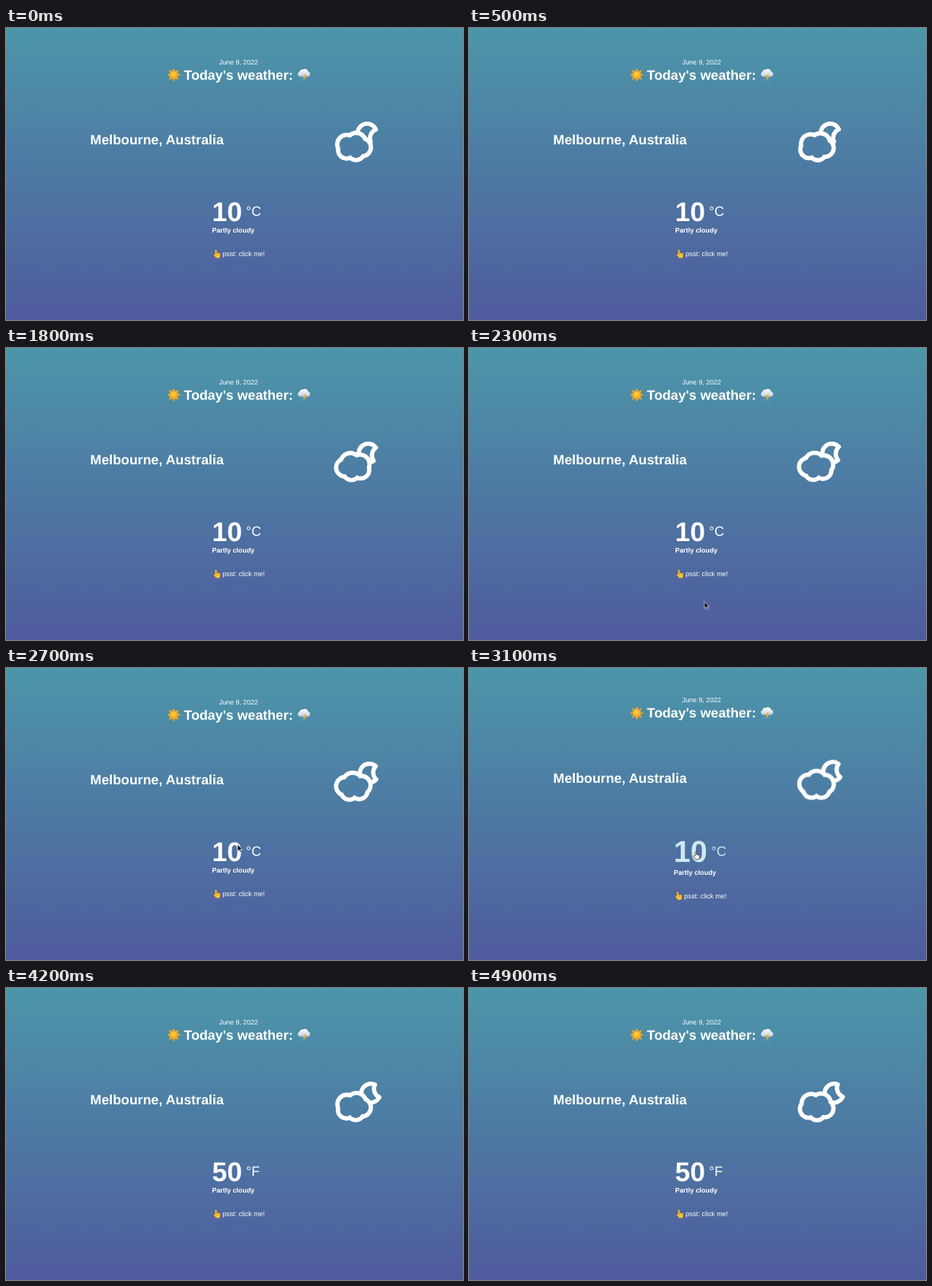
Animation, 600 px wide and 384 px high, one loop 5000 ms. Source, as an HTML page with a canvas:

```html
<!DOCTYPE html>
<html lang="en">
<head>
<meta charset="utf-8">
<title>Today's weather</title>
<style>
  html, body { margin: 0; width: 100%; height: 100%; overflow: hidden; }
  body { position: relative; background: linear-gradient(#4c96a9, #4f5b9d); }
  svg, canvas { position: absolute; display: block; }
  svg { left: 0; top: 0; width: 600px; height: 384px; }
  canvas { left: 425px; top: 107px; width: 80px; height: 80px; }
  text {
    font: 8.9px "Liberation Sans", Arial, Helvetica, sans-serif;
    fill: #fff; text-rendering: geometricPrecision; white-space: pre;
  }
  .bold { font-weight: 700; }
  .large { font-size: 17.8px; }
</style>
</head>
<body>
<svg viewBox="0 0 600 384">
  <defs>
    <radialGradient id="sunFill" cx=".45" cy=".4">
      <stop offset="0" stop-color="#ffd83f"/><stop offset="1" stop-color="#f9a71f"/>
    </radialGradient>
    <linearGradient id="cloudFill" x2="0" y2="1">
      <stop offset="0" stop-color="#fff"/><stop offset="1" stop-color="#c3cfdc"/>
    </linearGradient>
  </defs>

  <g id="upper">
    <text x="279.7" y="47.5">June 9, 2022</text>
    <text class="bold large" x="233.6" y="67.7">Today's weather:</text>
    <text class="bold large" x="110.6" y="153.2">Melbourne, Australia</text>
    <g transform="translate(220.3 61.6)">
      <g id="rays" fill="#f5a327"></g>
      <circle r="5.4" fill="url(#sunFill)"/>
    </g>
    <g transform="translate(382 53)">
      <path fill="url(#cloudFill)" d="M3.6 10.8a3.3 3.3 0 0 1-.2-6.3 3.6 3.6 0 0 1 4.3-2.7 4.4 4.4 0 0 1 7 2.4 3.4 3.4 0 0 1 .2 6.6z"/>
      <path fill="none" stroke="#4fa3e8" stroke-width="1.1" stroke-linecap="round" d="M4.6 11.8l-.7 1.7M7.3 13l-.8 2M13.6 11.8l-.7 1.7M5 15.3l-.4 1M12.8 15l-.5 1.2"/>
      <path fill="#f8a821" d="M9.4 8.2l-2 4.3h1.9l-1.2 4.6 4-5.8h-2l1.7-3.1z"/>
    </g>
  </g>

  <g id="lower">
    <text class="bold" x="270.5" y="269.4">Partly cloudy</text>
    <text x="284.3" y="300.3">psst: click me!</text>
    <g transform="translate(272.3 291.7)" fill="#fcc52e" stroke="#d98f16" stroke-width=".35" stroke-linejoin="round">
      <path d="M2.4 5.2V1.1a.95.95 0 0 1 1.9 0v3.2h3a1.3 1.3 0 0 1 1.4 1.4v2.5a2.7 2.7 0 0 1-2.6 2.7H3.9L.8 7.2c-.5-.7.3-1.4 1-.9z"/>
      <path fill="none" d="M4.3 4.3v2.4M5.8 4.4v2.2M7.3 4.5v2.1M2.4 5.3l1.3 2h2.4"/>
    </g>
  </g>

  <text id="degrees" class="bold"></text>
  <text id="unit" class="large" y="247.2"></text>
</svg>
<canvas id="icon"></canvas>
<svg viewBox="0 0 600 384">
  <g id="cursor">
    <path id="arrow" fill="#111" stroke="#fff" stroke-width=".6" stroke-linejoin="round" d="M0 0v9l2-1.9 1.4 3.2 1.5-.6-1.4-3.1h2.8z"/>
    <path id="hand" fill="#fff" stroke="#222" stroke-width=".7" stroke-linejoin="round" d="M-.9 5.2V.8a.85.85 0 0 1 1.7 0v2.6l3.3.7c.8.2 1 .7.9 1.4l-.6 2.6-.6 1.6H-.4L-3.1 6c-.6-.8.2-1.6 1-1.1z"/>
  </g>
</svg>

<script>
const LOOP = 5000, STEP = 100, TAU = Math.PI * 2;
const WHITE = [255, 255, 255], HOVER = [171, 215, 229];
const CLICK = 3300, HOVER_IN = 2850, HOVER_OUT = 3750;
// time, x, y of the pointer tip
const PATH = [[2150, 312, 392], [2450, 306, 275], [2700, 304, 232], [3000, 298, 242], [3750, 298, 242]];

const $ = id => document.getElementById(id);
const mix = (a, b, k) => a + (b - a) * k;
const smooth = x => { x = Math.min(1, Math.max(0, x)); return x * x * (3 - 2 * x); };

const ctx = $('icon').getContext('2d');
const ratio = window.devicePixelRatio || 1;
$('icon').width = $('icon').height = 80 * ratio;

$('rays').innerHTML = Array.from({ length: 8 }, (_, i) =>
  `<path transform="rotate(${i * 45})" d="M-2.1-5.6L0-8.9 2.1-5.6z"/>`).join('');

function puffs(turn, x, y, rx, ry, min, max) {
  for (let i = 0; i < 5; i++) {
    const a = (turn + i / 5) * TAU, c = Math.cos(a), grow = max - min;
    ctx.beginPath();
    ctx.arc(x - Math.sin(a) * rx, y + c * ry + grow / 2, min + (1 - c / 2) * grow, 0, TAU);
    ctx.fill();
  }
}

function moon(turn, x, y, w, line) {
  const r = w * 0.29 - line / 2, c = Math.cos(turn * TAU), tilt = -c * TAU / 16;
  const reach = r * Math.SQRT2;
  x += c * w * 0.05;
  ctx.lineWidth = line;
  ctx.beginPath();
  ctx.arc(x, y, r, tilt + TAU / 8, tilt + TAU * 7 / 8);
  ctx.arc(x + Math.cos(tilt) * reach, y + Math.sin(tilt) * reach, r, tilt + TAU * 5 / 8, tilt + TAU * 3 / 8, true);
  ctx.closePath();
  ctx.stroke();
}

function drawIcon(t) {
  const size = 70, w = size * 0.75, line = size * 0.08;
  const turn = 0.8 + 0.049 * (t / 1000 - 1);
  const x = size * 0.375, y = size * 0.625;
  ctx.setTransform(ratio, 0, 0, ratio, 0, 0);
  ctx.clearRect(0, 0, 80, 80);
  ctx.translate(5, 5);
  ctx.fillStyle = ctx.strokeStyle = '#fff';
  ctx.lineCap = ctx.lineJoin = 'round';
  moon(turn * 2, size * 0.667, size * 0.375, w, line);
  puffs(turn, x, y, w * 0.21, w * 0.12, w * 0.24, w * 0.28);
  ctx.globalCompositeOperation = 'destination-out';
  puffs(turn, x, y, w * 0.21, w * 0.12, w * 0.24 - line, w * 0.28 - line);
  ctx.globalCompositeOperation = 'source-over';
}

function drawPage(t) {
  const k = smooth((t - HOVER_IN) / 450) - smooth((t - HOVER_OUT) / 400);
  const size = mix(35.6, 42.7, k), left = 270.5 - 3 * k;
  const color = `rgb(${WHITE.map((v, i) => Math.round(mix(v, HOVER[i], k)))})`;
  const warm = t >= CLICK;

  $('upper').setAttribute('transform', `translate(0 ${-4 * k})`);
  $('icon').style.transform = `translateY(${-4 * k}px)`;
  $('lower').setAttribute('transform', `translate(${-3 * k} ${4 * k})`);

  const num = $('degrees'), unit = $('unit');
  num.textContent = warm ? '50' : '10';
  num.setAttribute('x', left);
  num.setAttribute('y', mix(253.6, 256.1, k));
  num.style.fontSize = size + 'px';
  unit.textContent = warm ? '°F' : '°C';
  unit.setAttribute('x', left + size * 1.112 + 4.95);
  num.style.fill = unit.style.fill = color;
}

function drawCursor(t) {
  const i = PATH.findIndex((p, n) => n && t >= PATH[n - 1][0] && t < p[0]);
  $('cursor').style.display = i < 0 ? 'none' : '';
  if (i < 0) return;
  const [t0, x0, y0] = PATH[i - 1], [t1, x1, y1] = PATH[i];
  const k = (t - t0) / (t1 - t0), over = t >= HOVER_IN;
  $('cursor').setAttribute('transform', `translate(${mix(x0, x1, k)} ${mix(y0, y1, k)})`);
  $('arrow').style.display = over ? 'none' : '';
  $('hand').style.display = over ? '' : 'none';
}

function frame() {
  const t = Math.floor(performance.now() % LOOP / STEP) * STEP;
  drawIcon(t);
  drawPage(t);
  drawCursor(t);
  requestAnimationFrame(frame);
}
frame();
</script>
</body>
</html>
```
